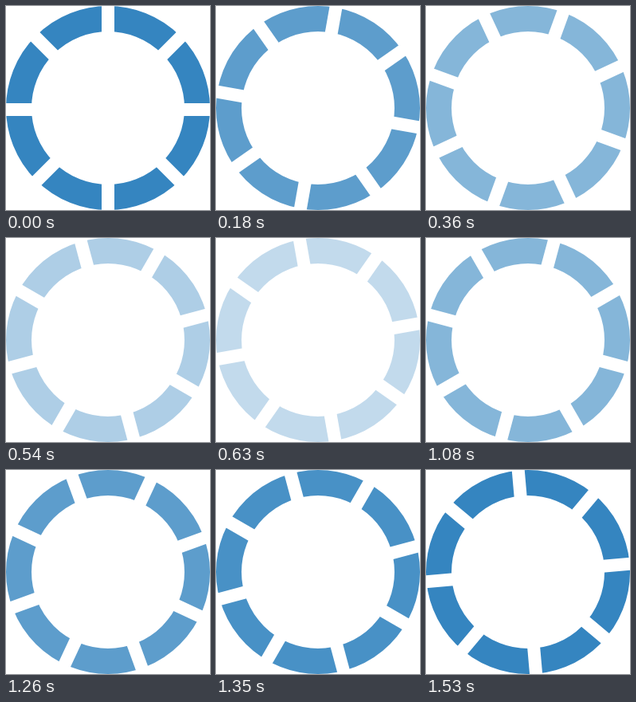
These frames come from a looping animation (256 by 256 pixels, 1620 ms). An HTML page:

```html
<!DOCTYPE html>
<html lang="en">
<head>
<meta charset="utf-8">
<title>Loading ring</title>
<style>
  /* A registered angle keeps the rotated edges smooth. */
  @property --turn {
    syntax: "<angle>";
    inherits: false;
    initial-value: 0deg;
  }
  html, body {
    margin: 0;
    width: 100%;
    height: 100%;
    overflow: hidden;
    background: #fff;
  }
  svg {
    display: block;
    width: 100%;
    height: 100%;
  }
  .ring {
    fill: none;
    stroke: #3585c0;
    stroke-width: 32;
    animation: fade 1620ms infinite;
  }
  .gaps {
    stroke: #fff;
    stroke-width: 16;
    transform-origin: 128px 129px;
    transform: rotate(var(--turn));
    animation: turn 1620ms steps(18) infinite;
  }
  @keyframes turn {
    to { --turn: 90deg; }
  }
  /* Down in eight steps, back up in eight, then hold. */
  @keyframes fade {
    0% { stroke-opacity: 1; animation-timing-function: steps(8); }
    44.444% { stroke-opacity: .2; animation-timing-function: steps(8); }
    88.888%, 100% { stroke-opacity: 1; }
  }
</style>
</head>
<body>
<svg viewBox="0 0 256 256">
  <circle class="ring" cx="128" cy="128" r="112"/>
  <!-- The spokes cross slightly below the centre of rotation. -->
  <g class="gaps">
    <g transform="translate(128 130)">
      <path id="spoke" d="M0-140V140"/>
      <use href="#spoke" transform="rotate(45)"/>
      <use href="#spoke" transform="rotate(90)"/>
      <use href="#spoke" transform="rotate(135)"/>
    </g>
  </g>
</svg>
</body>
</html>
```
